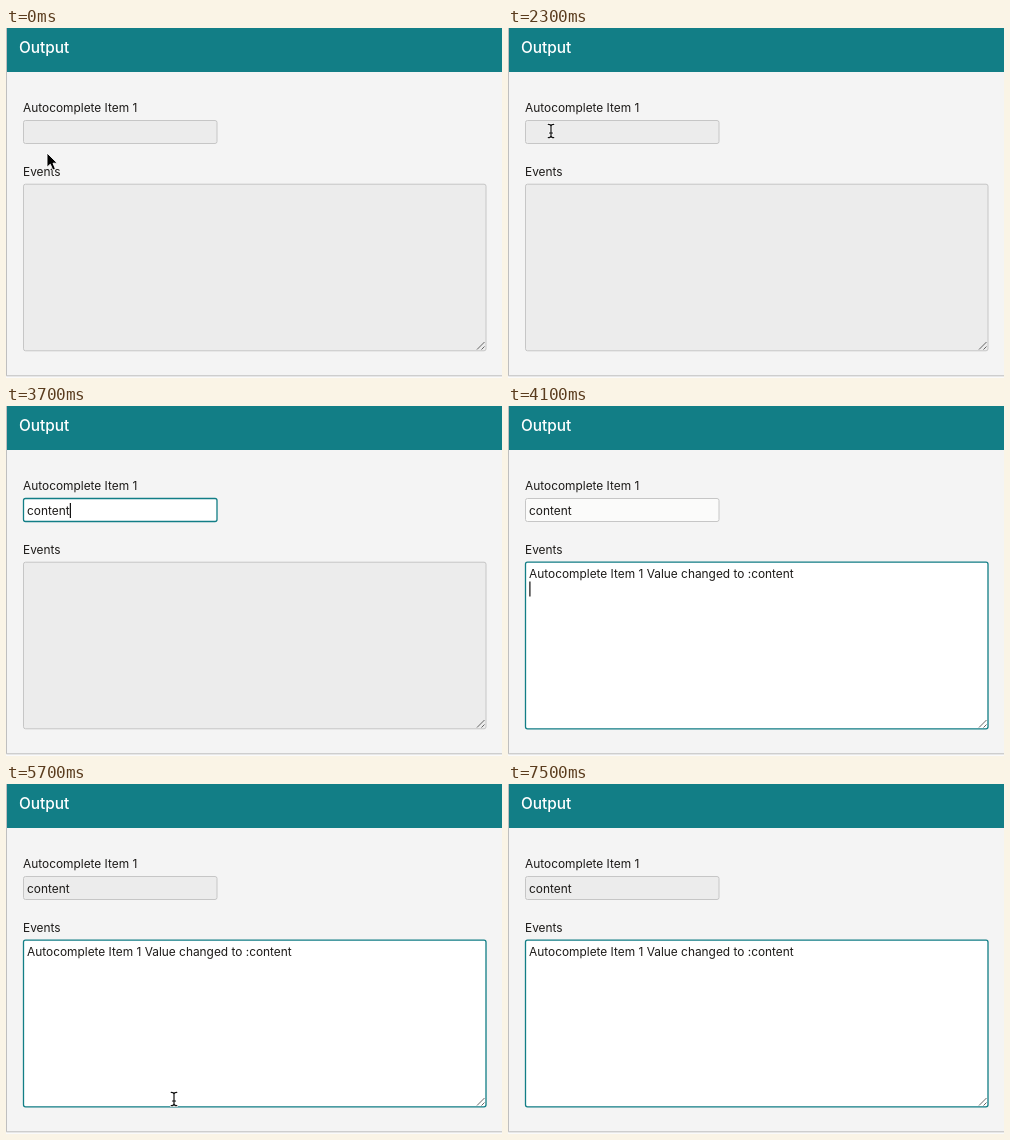
These frames come from a looping animation (496 by 350 pixels, 7600 ms). An HTML page:

```html
<!DOCTYPE html>
<html lang="en">
<head>
<meta charset="utf-8">
<title>Autocomplete events</title>
<style>
html, body { margin: 0; width: 100%; height: 100%; overflow: hidden; background: #f4f4f4; }
svg { display: block; width: 496px; height: 350px; }
text { font: 11.9px Inter, "Open Sans", sans-serif; fill: #1d1b19; white-space: pre; }
.title { font-size: 15.4px; font-weight: 500; fill: #fff; }
</style>
</head>
<body>
<svg viewBox="0 0 496 350">
  <rect width="496" height="350" fill="#f4f4f4"/>
  <rect y="348.5" width="496" height="1.5" fill="#fafafa"/>
  <path d="M.5 0V347.8H496" fill="none" stroke="#bfbfbf"/>
  <rect x="1" width="495" height="44" fill="#127e86"/>
  <text class="title" x="13" y="25.3">Output</text>
  <text x="17" y="84">Autocomplete Item 1</text>
  <text x="17" y="148">Events</text>

  <rect id="field" x="17.5" y="92.5" width="193.5" height="23" rx="2"/>
  <text id="value" x="21" y="109"></text>

  <rect id="area" x="17.5" y="156.2" width="462.5" height="166.6" rx="2"/>
  <text id="log" x="21" y="172">Autocomplete Item 1 Value changed to :content</text>
  <path d="M471 321.5L478.5 314M475.5 321.5L478.5 318.5" stroke="#555" stroke-width=".9"/>

  <g id="popup">
    <rect x="16" y="117" width="198" height="45" rx="3" fill="#000" opacity=".06"/>
    <rect x="17.5" y="117" width="193.5" height="42" rx="2" fill="#fff" stroke="#d8d8d8"/>
  </g>
  <rect id="caret" width="1.2" fill="#111"/>

  <path id="arrow" d="M0 0V14.2L3.3 11.2L5.8 17L8.4 15.9L6 10.2H10.3Z"
        fill="#000" stroke="#fff" stroke-width=".9"/>
  <g id="beam" fill="none" stroke-linecap="round">
    <path d="M-2.8-6.7Q0-6.7 0-4.8Q0-6.7 2.8-6.7M0-4.8V4.8M-2.8 6.7Q0 6.7 0 4.8Q0 6.7 2.8 6.7M-1.5 2H1.5"
          stroke="#fff" stroke-width="2.6"/>
    <path d="M-2.8-6.7Q0-6.7 0-4.8Q0-6.7 2.8-6.7M0-4.8V4.8M-2.8 6.7Q0 6.7 0 4.8Q0 6.7 2.8 6.7M-1.5 2H1.5"
          stroke="#111" stroke-width="1.2"/>
  </g>
</svg>
<script>
const LOOP = 7600;
const $ = id => document.getElementById(id);
const set = (el, attrs) => { for (const k in attrs) el.setAttribute(k, attrs[k]); };
const show = (el, on) => set(el, { visibility: on ? "visible" : "hidden" });

// [start, pointer shape, x, y]
const pointer = [
  [0, "arrow", 41, 125], [100, "arrow", 40.5, 108], [300, "arrow", 41, 106],
  [400, "arrow", 41, 104], [2300, "beam", 43, 103], [2500, ""],
  [5000, "beam", 62, 205], [5100, "beam", 109, 316], [5500, "beam", 135, 295],
  [5600, "beam", 156, 309], [5700, "beam", 168, 315],
  [6000, "arrow", 163, 319], [6100, ""]
];
const typed = [
  [0, ""], [3200, "c"], [3300, "co"], [3400, "con"],
  [3500, "cont"], [3600, "conten"], [3700, "content"]
];
const blink = [
  [0, false], [2400, true], [2900, false], [3200, true], [4500, false],
  [5000, true], [5500, false], [6000, true], [6500, false], [7100, true], [7500, false]
];
const at = (track, t) => track.findLast(step => step[0] <= t);

function box(el, focused, fill) {
  set(el, {
    fill,
    stroke: focused ? "#127e86" : "#c6c6c6",
    "stroke-width": focused ? 1.3 : 1
  });
}

function draw(t) {
  const logged = t >= 4100;
  const editing = t >= 2400 && !logged;
  const idle = logged && t < 4500 ? "#fbfbfa" : "#ececec";

  box($("field"), editing, editing ? "#fff" : idle);
  box($("area"), logged, logged ? "#fff" : "#ececec");
  show($("log"), logged);
  show($("popup"), t >= 3400 && t < 3600);

  const value = $("value");
  value.textContent = at(typed, t)[1];
  const end = value.textContent ? value.getComputedTextLength() : 0.4;
  set($("caret"), logged
    ? { x: 21.3, y: 175.5, height: 15 }
    : { x: 21.2 + end, y: 97, height: 15 });
  show($("caret"), at(blink, t)[1]);

  const [, shape, x, y] = at(pointer, t);
  for (const id of ["arrow", "beam"]) {
    show($(id), id === shape);
    if (id === shape) set($(id), { transform: `translate(${x} ${y})` });
  }
}

const start = performance.now();
function tick() {
  draw((performance.now() - start) % LOOP);
  requestAnimationFrame(tick);
}
tick();
</script>
</body>
</html>
```
